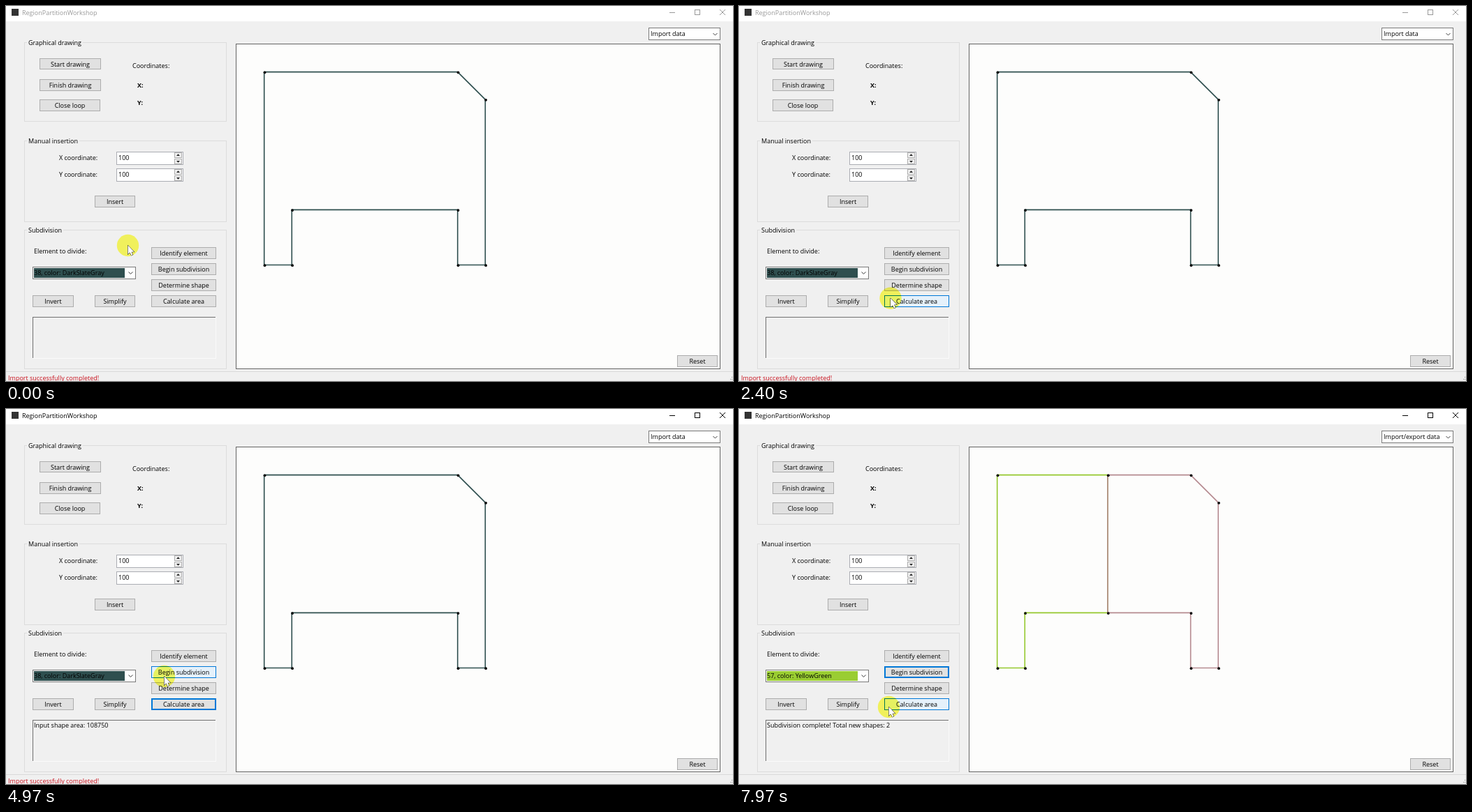
An HTML page with a canvas that plays this animation: 1041 by 538 pixels, repeating every 8000 ms.

```html
<!DOCTYPE html>
<html lang="en">
<head>
<meta charset="utf-8">
<title>Partition workshop</title>
<style>
  html, body { margin: 0; width: 1041px; height: 538px; overflow: hidden; background: #f0f0f0; }
  canvas { display: block; }
</style>
</head>
<body>
<canvas id="stage" width="1041" height="538"></canvas>
<script>
const c = document.getElementById('stage').getContext('2d');
const LOOP = 8000;
const FACE = '#f0f0f0', PAPER = '#fdfdfc', BLUE = '#0078d7';
const FONT = '9px "Open Sans", "Noto Sans", sans-serif';

// Moments in ms: mouse down and up on each clicked button
const CALC = { down: 2850, up: 2970 };
const SPLIT = { down: 6300, up: 6420 };

// Pointer path: time, x, y
const PATH = [
  [0, 174, 343], [1300, 174, 343], [1800, 199, 403], [2100, 209, 412],
  [2500, 219, 421], [4540, 219, 421], [4970, 226, 383], [5240, 226, 380],
  [7570, 226, 380], [7970, 214, 427], [8000, 214, 427]
];

// Label, x, y, width, height
const BUTTONS = [
  ['Start drawing', 48, 75, 88, 16], ['Finish drawing', 48, 105, 88, 17],
  ['Close loop', 48, 134, 87, 17], ['Insert', 127, 272, 58, 17],
  ['Identify element', 208, 346, 93, 17], ['Begin subdivision', 208, 369, 93, 17],
  ['Determine shape', 208, 392, 93, 17], ['Calculate area', 208, 415, 93, 17],
  ['Invert', 38, 415, 59, 17], ['Simplify', 127, 415, 58, 17],
  ['Reset', 961, 501, 58, 17]
];

// Outlines in grid units
const WHOLE = [[0, 0], [7, 0], [8, 1], [8, 7], [7, 7], [7, 5], [1, 5], [1, 7], [0, 7]];
const LEFT = [[0, 0], [4, 0], [4, 5], [1, 5], [1, 7], [0, 7]];
const RIGHT = [[4, 0], [7, 0], [8, 1], [8, 7], [7, 7], [7, 5], [4, 5]];

function rect(x, y, w, h, fill) {
  c.fillStyle = fill;
  c.fillRect(x, y, w, h);
}

function box(x, y, w, h, fill, edge, weight = 1) {
  rect(x, y, w, h, edge);
  rect(x + weight, y + weight, w - 2 * weight, h - 2 * weight, fill);
}

// y is the middle of the line of text
function text(s, x, y, color = '#000', align = 'left', bold = false) {
  c.font = (bold ? 'bold ' : '') + FONT;
  c.textAlign = align;
  c.fillStyle = color;
  c.fillText(s, x, y + 3);
}

function trace(points, close) {
  c.beginPath();
  for (const [x, y] of points) c.lineTo(x, y);
  if (close) c.closePath();
}

function line(points, color, width = 1, close = false) {
  trace(points, close);
  c.strokeStyle = color;
  c.lineWidth = width;
  c.stroke();
}

function chevron(x, y) {
  line([[x - 3, y - 1.5], [x, y + 1.5], [x + 3, y - 1.5]], '#404040');
}

function titleBar(active) {
  const ink = active ? '#000' : '#999';
  rect(0, 0, 1041, 22, '#fff');
  rect(8, 4, 10, 10, '#333');
  text('RegionPartitionWorkshop', 23, 9.5, ink);
  rect(950, 9, 8, 1, ink);
  box(986, 5, 8, 8, '#fff', ink);
  line([[1022, 5], [1030, 13]], ink);
  line([[1030, 5], [1022, 13]], ink);
}

function group(label, y, h) {
  c.strokeStyle = '#dcdcdc';
  c.lineWidth = 1;
  c.strokeRect(26.5, y + 0.5, 289, h);
  c.font = FONT;
  rect(30, y - 2, c.measureText(label).width + 4, 5, FACE);
  text(label, 32, y + 0.5);
}

function spinner(y) {
  box(158, y, 96, 19, '#fff', '#abadb3');
  text('100', 161, y + 8.5);
  for (const [top, dir] of [[y + 1, -1], [y + 10, 1]]) {
    box(241, top, 11, 8, FACE, '#adadad');
    const mid = top + 4;
    trace([[244, mid - dir], [249, mid - dir], [246.5, mid + dir * 1.8]], true);
    c.fillStyle = '#222';
    c.fill();
  }
}

function button([label, x, y, w, h], pointer, focus, pressed) {
  const [px, py] = pointer;
  const hover = px >= x && px < x + w && py >= y && py < y + h;
  if (hover && pressed) box(x, y, w, h, '#cce4f7', '#005499');
  else if (hover) box(x, y, w, h, '#e5f1fb', BLUE);
  else if (label === focus) box(x, y, w, h, '#e1e1e1', BLUE, 2);
  else box(x, y, w, h, '#e1e1e1', '#adadad');
  text(label, x + w / 2, y + 8.5, '#000', 'center');
}

const place = ([u, v]) => [369.7 + u * 39.57, 94.6 + v * 39.55];

function outline(points, color) {
  line(points.map(place), color, 1.6, true);
}

function dots(points) {
  c.fillStyle = '#000';
  for (const [x, y] of points.map(place)) {
    c.beginPath();
    c.arc(x + 0.8, y + 0.7, 1.9, 0, 7);
    c.fill();
  }
}

function drawing(split) {
  box(329, 54, 694, 467, PAPER, '#646464');
  if (split) {
    outline(LEFT, '#95c82d');
    outline(RIGHT, '#b58a90');
    dots([...WHOLE, [4, 0], [4, 5]]);
  } else {
    outline(WHOLE, '#2f4f4f');
    dots(WHOLE);
  }
}

function pointerAt(t) {
  const i = PATH.findIndex(p => p[0] > t);
  const [t0, x0, y0] = PATH[i - 1], [t1, x1, y1] = PATH[i];
  const k = (t - t0) / (t1 - t0);
  return [x0 + (x1 - x0) * k, y0 + (y1 - y0) * k];
}

function cursor([x, y]) {
  c.globalCompositeOperation = 'multiply';
  c.fillStyle = '#ffff62';
  c.beginPath();
  c.arc(x + 0.5, y + 0.5, 15.7, 0, 7);
  c.fill();
  c.globalCompositeOperation = 'source-over';
  const arrow = [[0, 0], [0, 13], [3, 10.2], [5, 14.6], [7, 13.7], [5.1, 9.4], [9.2, 9.4]];
  line(arrow.map(([u, v]) => [x + u + 0.5, y + v + 0.3]), '#000', 1, true);
  c.fillStyle = '#fff';
  c.fill();
}

function render(t) {
  const pointer = pointerAt(t);
  const split = t >= SPLIT.up;
  const pressed = [CALC, SPLIT].some(k => t >= k.down && t < k.up);
  const focus = t >= SPLIT.down ? 'Begin subdivision' : t >= CALC.down ? 'Calculate area' : '';

  rect(0, 0, 1041, 538, FACE);
  titleBar(t >= CALC.down);
  group('Graphical drawing', 52, 113);
  group('Manual insertion', 193, 116);
  group('Subdivision', 321, 199);

  text('Coordinates:', 181, 86);
  text('X:', 188, 113.5, '#000', 'left', true);
  text('Y:', 188, 139, '#000', 'left', true);
  text('X coordinate:', 76, 217.5);
  text('Y coordinate:', 76, 241.5);
  spinner(209);
  spinner(233);
  text('Element to divide:', 40, 351.5);

  box(38, 374, 148, 18, '#fff', '#7a7a7a');
  rect(40, 376, 130, 14, split ? '#9acd32' : '#2f4f4f');
  text(split ? '57, color: YellowGreen' : '38, color: DarkSlateGray', 40, 382.5);
  chevron(178.5, 383);

  rect(38, 446, 263, 60, '#fafafa');
  rect(38, 446, 262, 59, '#707070');
  rect(39, 447, 261, 58, FACE);
  const note = split ? 'Subdivision complete! Total new shapes: 2'
    : t >= CALC.up ? 'Input shape area: 108750' : '';
  text(note, 40, 454);

  box(920, 31, 103, 18, '#fff', '#7a7a7a');
  text(split ? 'Import/export data' : 'Import data', 923, 40);
  chevron(1015.5, 40.5);

  drawing(split);
  for (const b of BUTTONS) button(b, pointer, focus, pressed);

  rect(0, 524, 1041, 1, '#d9d9d9');
  if (!split) text('Import successfully completed!', 3, 534, '#c8101c');
  for (const [x, y] of [[1039, 532], [1037, 535], [1039, 535]]) rect(x, y, 1, 1, '#888');

  cursor(pointer);
}

const start = performance.now();
function tick() {
  render((performance.now() - start) % LOOP);
  requestAnimationFrame(tick);
}
tick();
</script>
</body>
</html>
```
